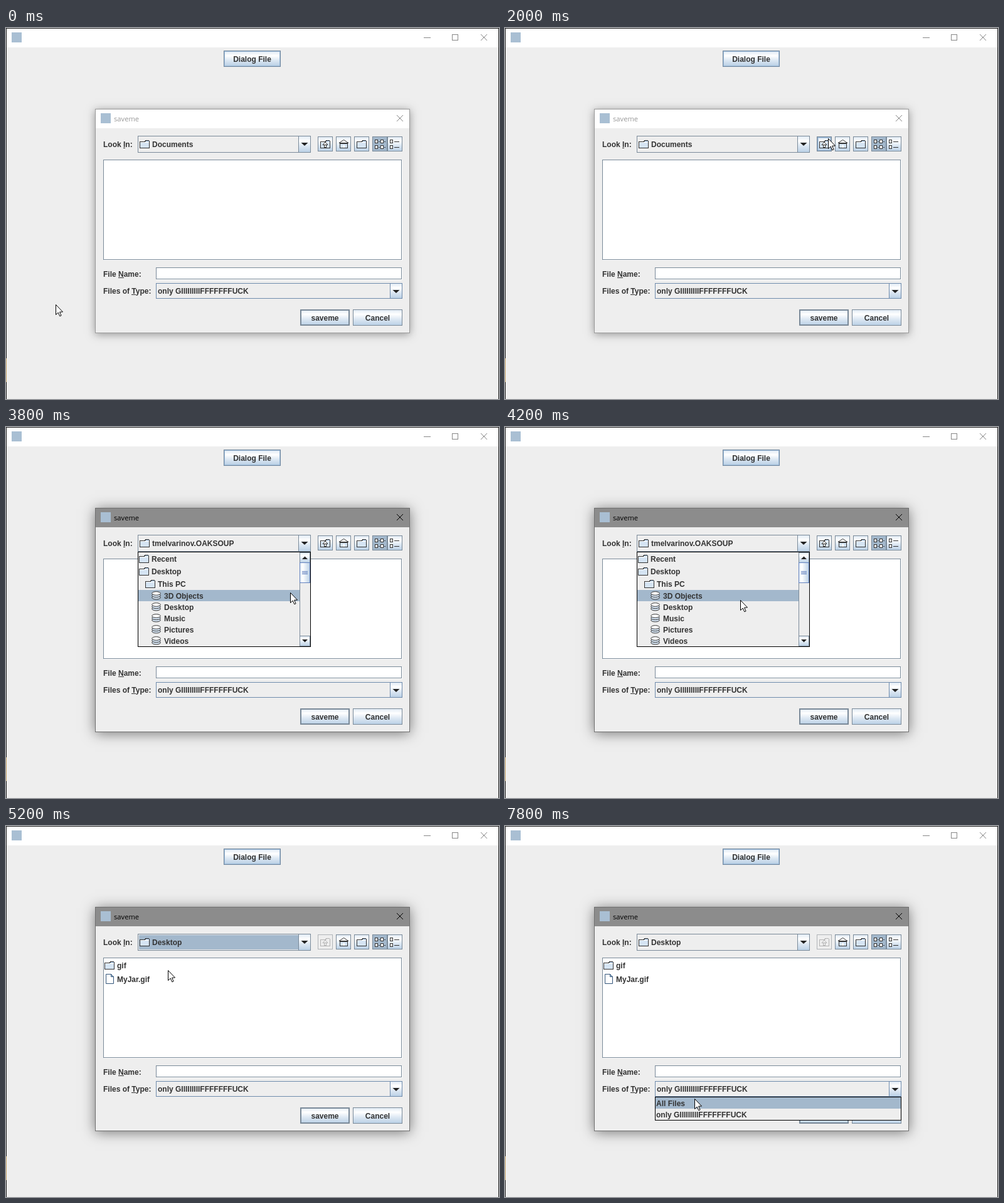
Animation, 786 px wide and 592 px high, one loop 8 s. Source, as an HTML page with a canvas:

```html
<!DOCTYPE html>
<html lang="en">
<head>
<meta charset="utf-8">
<title>File dialog</title>
<style>
html, body { margin: 0; height: 100%; overflow: hidden; background: #eee; }
canvas { display: block; }
</style>
</head>
<body>
<canvas id="stage" width="786" height="592"></canvas>
<script>
const ctx = document.getElementById('stage').getContext('2d');
const LOOP = 8000, STEP = 200;
const GREY = '#eeeeee', EDGE = '#7a8a99', PICK = '#a3b8cc', INK = '#333333', PALE = '#b8cfe5';
const BOLD = 'bold 12px "Liberation Sans", Arial, sans-serif';
const TITLE = '11.2px "Open Sans", "Noto Sans", sans-serif';
const FILTER = 'only GIIIIIIIIIFFFFFFFUCK';

// Pointer tip: time, x, y
const path = [
  [1000, 79, 441], [2000, 515, 176], [2400, 515, 176], [2800, 485, 186], [3600, 485, 186],
  [4000, 420, 341], [4200, 375, 276], [4800, 258, 230], [5400, 258, 230], [6000, 192, 400],
  [6200, 215, 483], [6600, 285, 473], [6800, 319, 449], [7400, 305, 416], [7600, 305, 416],
  [7800, 302, 435]
];

// Folder popup: label, indent, row height
const places = [
  ['Recent', 0, 20], ['Desktop', 0, 20], ['This PC', 10, 20], ['3D Objects', 20, 18],
  ['Desktop', 20, 18], ['Music', 20, 18], ['Pictures', 20, 18], ['Videos', 20, 18]
];

function pointerAt(t) {
  const next = path.findIndex(k => k[0] >= t);
  if (next <= 0) return path[0].slice(1);
  const [t0, x0, y0] = path[next - 1], [t1, x1, y1] = path[next];
  const u = (t - t0) / (t1 - t0);
  return [Math.round(x0 + (x1 - x0) * u), Math.round(y0 + (y1 - y0) * u)];
}

function fill(x, y, w, h, color) {
  ctx.fillStyle = color;
  ctx.fillRect(x, y, w, h);
}

function box(x, y, w, h, inside, edge = EDGE, line = 1) {
  fill(x, y, w, h, edge);
  fill(x + line, y + line, w - 2 * line, h - 2 * line, inside);
}

function poly(points, inside, edge, close = true) {
  ctx.beginPath();
  points.forEach(([x, y]) => ctx.lineTo(x, y));
  if (close) ctx.closePath();
  if (inside) { ctx.fillStyle = inside; ctx.fill(); }
  if (edge) { ctx.strokeStyle = edge; ctx.lineWidth = 1; ctx.stroke(); }
}

function text(str, x, y, color = INK, font = BOLD, align = 'left') {
  ctx.font = font;
  ctx.textAlign = align;
  ctx.fillStyle = color;
  ctx.fillText(str, x, y);
}

function label(str, x, y, key) {
  text(str, x, y);
  const start = ctx.measureText(str.slice(0, str.indexOf(key))).width;
  fill(Math.round(x + start), y + 1, Math.round(ctx.measureText(key).width), 1, INK);
}

function shade(y, h) {
  const g = ctx.createLinearGradient(0, y, 0, y + h);
  [[0, '#dde8f3'], [.3, '#fff'], [.6, '#dde8f3'], [1, PALE]].forEach(s => g.addColorStop(...s));
  return g;
}

function button(x, y, w, h, str, line = 1) {
  box(x, y, w, h, shade(y, h), EDGE, line);
  if (str) text(str, x + w / 2, y + 18, INK, BOLD, 'center');
}

function cross(x, y, color) {
  poly([[x, y], [x + 10, y + 10]], null, color, false);
  poly([[x + 10, y], [x, y + 10]], null, color, false);
}

function arrow(x, y, w, h) {
  poly([[x - w, y], [x + w, y], [x, y + h]], '#222');
}

function folder(x, y, edge = INK, body = '#d5e4f3') {
  fill(x + 9, y, 6, 1, edge);
  fill(x + 8, y + 1, 8, 2, edge);
  fill(x + 10, y + 1, 5, 1, body === GREY ? GREY : '#9db8d6');
  box(x, y + 2, 16, 11, body, edge);
  fill(x + 1, y + 3, 14, 1, body === GREY ? GREY : '#fff');
  fill(x + 9, y + 2, 6, 1, body);
}

function drive(x, y) {
  for (let i = 2; i >= 0; i--) {
    ctx.beginPath();
    ctx.ellipse(x + 7.5, y + 3.5 + i * 3.3, 6.8, 2.8, 0, 0, 7);
    ctx.fillStyle = i ? '#d5e4f3' : '#fff';
    ctx.strokeStyle = INK;
    ctx.lineWidth = 1;
    ctx.fill();
    ctx.stroke();
  }
}

function combo(x, y, w, h, edge, inside) {
  box(x, y, w, h, GREY, edge);
  if (inside) fill(x + 2, y + 2, w - 22, h - 4, inside);
  fill(x + w - 20, y + 1, 1, h - 2, edge);
  fill(x + w - 19, y + 1, 18, h - 2, shade(y, h));
  arrow(x + w - 10, y + 11, 5.5, 5);
}

function sunken(x, y, w, h) {
  box(x, y, w, h, '#fff');
  fill(x + 1, y + h, w, 1, '#fff');
  fill(x + w, y + 1, 1, h, '#fff');
}

function mainWindow() {
  fill(0, 0, 786, 592, '#1f1f1f');
  fill(1, 1, 784, 30, '#fff');
  fill(1, 31, 784, 561, GREY);
  fill(0, 527, 1, 38, '#c9a66b');
  fill(9, 7, 16, 16, '#a9bfd3');
  fill(666, 15, 11, 1, '#888');
  box(711, 10, 10, 10, '#fff', '#888');
  cross(757, 10, '#888');
  box(347, 36, 91, 26, '#9dbbd9', '#71879e');
  fill(349, 38, 87, 22, shade(37, 24));
  text('Dialog File', 392.5, 54, INK, BOLD, 'center');
}

function upButton(t) {
  const off = t >= 5000;
  const hot = t >= 1900 && t < 3000;
  if (off) box(497, 173, 24, 24, GREY, '#b0b4b8');
  else button(497, 173, 24, 24);
  if (hot) {
    box(498, 174, 22, 22, PALE, '#8ba9c9');
    fill(500, 176, 18, 18, shade(174, 22));
  }
  const ink = off ? '#b5b5b5' : INK;
  folder(501, 179, ink, off ? GREY : '#d5e4f3');
  poly([[509, 182], [513, 186.5], [505, 186.5]], off ? GREY : '#fff', ink);
  box(507, 186, 4, 5, off ? GREY : '#fff', ink);
}

function toolbar(t) {
  upButton(t);
  button(526, 173, 24, 24);
  box(532, 184, 13, 8, '#d5e4f3', INK);
  poly([[538.5, 178.5], [546, 183.5], [531, 183.5]], '#fff', INK);
  fill(537, 187, 3, 4, '#fff');
  button(555, 173, 24, 24);
  folder(559, 179);
  box(584, 173, 24, 24, PICK);
  button(608, 173, 24, 24);
  for (const y of [178, 187]) {
    for (const x of [588, 597, 612]) box(x, y, 5, 6, '#fff', INK);
    fill(594, y + 3, 2, 1, INK);
    fill(603, y + 3, 2, 1, INK);
    fill(619, y + 3, 8, 1, INK);
  }
}

function dialog(t) {
  const active = t >= 2200;
  ctx.save();
  ctx.shadowColor = active ? 'rgba(0,0,0,.5)' : 'rgba(0,0,0,.38)';
  ctx.shadowBlur = active ? 20 : 13;
  ctx.shadowOffsetY = 2;
  fill(142, 129, 502, 358, active ? '#6f6f6f' : '#9a9a9a');
  ctx.restore();
  fill(143, 130, 500, 356, GREY);
  fill(143, 130, 500, 30, active ? '#8c8c8c' : '#fff');
  fill(151, 136, 16, 16, '#a9bfd3');
  text('saveme', 172, 149, active ? '#000' : '#999', TITLE);
  cross(623, 139, active ? '#000' : '#888');

  label('Look In:', 155, 190, 'I');
  combo(210, 172, 276, 27, EDGE, t >= 5000 && t < 7400 ? PICK : null);
  folder(213, 179);
  text(t < 2400 ? 'Documents' : t < 5000 ? 'tmelvarinov.OAKSOUP' : 'Desktop', 233, 190);
  toolbar(t);

  sunken(155, 210, 476, 160);
  if (t >= 5200) {
    folder(157, 216);
    text('gif', 177, 227);
    poly([[159.5, 236.5], [167.5, 236.5], [171.5, 240.5], [171.5, 251.5], [159.5, 251.5]], '#fff', '#33557a');
    poly([[167.5, 236.5], [167.5, 240.5], [171.5, 240.5]], PALE, '#33557a');
    text('MyJar.gif', 177, 249);
  }

  label('File Name:', 155, 397, 'N');
  sunken(239, 382, 392, 19);
  label('Files of Type:', 155, 424, 'T');
  combo(239, 407, 393, 25, '#6f8bac');
  text(FILTER, 242, 424);
  button(469, 449, 79, 26, 'saveme', 2);
  button(553, 449, 79, 26, 'Cancel');
}

function folderPopup(px, py) {
  box(210, 199, 276, 152, GREY, '#000');
  let y = 200;
  for (const [name, indent, h] of places) {
    if (px < 468 && py >= y && py < y + h) fill(211, y, 257, h, PICK);
    if (h === 20) folder(212 + indent, y + 4);
    else drive(212 + indent, y + 2);
    text(name, 232 + indent, y + h / 2 + 5);
    y += h;
  }
  fill(468, 200, 1, 150, EDGE);
  button(468, 200, 17, 17);
  poly([[472, 211], [481, 211], [476.5, 206.5]], '#222');
  button(468, 333, 17, 17);
  arrow(476.5, 339, 4.5, 4.5);
  const g = ctx.createLinearGradient(468, 0, 485, 0);
  [[0, '#dde8f3'], [.3, '#fff'], [1, PALE]].forEach(s => g.addColorStop(...s));
  box(468, 216, 17, 33, g, '#6382bf');
  for (let i = 0; i < 3; i++) fill(472, 230 + i * 2, 9, 1, '#6382bf');
}

function typePopup(py) {
  box(239, 432, 393, 38, GREY, '#000');
  fill(240, py > 432 ? 433 : 451, 391, 18, PICK);
  text('All Files', 241, 447);
  text(FILTER, 241, 465);
}

function pointer(x, y) {
  const shape = [[0, 0], [0, 16], [3.7, 12.6], [6.3, 18.3], [8.6, 17.3], [6.1, 11.7], [11, 11.5]];
  poly(shape.map(p => [x + .5 + p[0], y + .5 + p[1]]), '#fff', '#000');
}

function draw(now) {
  const t = Math.floor(now % LOOP / STEP) * STEP;
  const [px, py] = pointerAt(t);
  mainWindow();
  dialog(t);
  if (t >= 3000 && t < 5000) folderPopup(px, py);
  if (t >= 7400) typePopup(py);
  pointer(px, py);
  requestAnimationFrame(draw);
}
requestAnimationFrame(draw);
</script>
</body>
</html>
```
